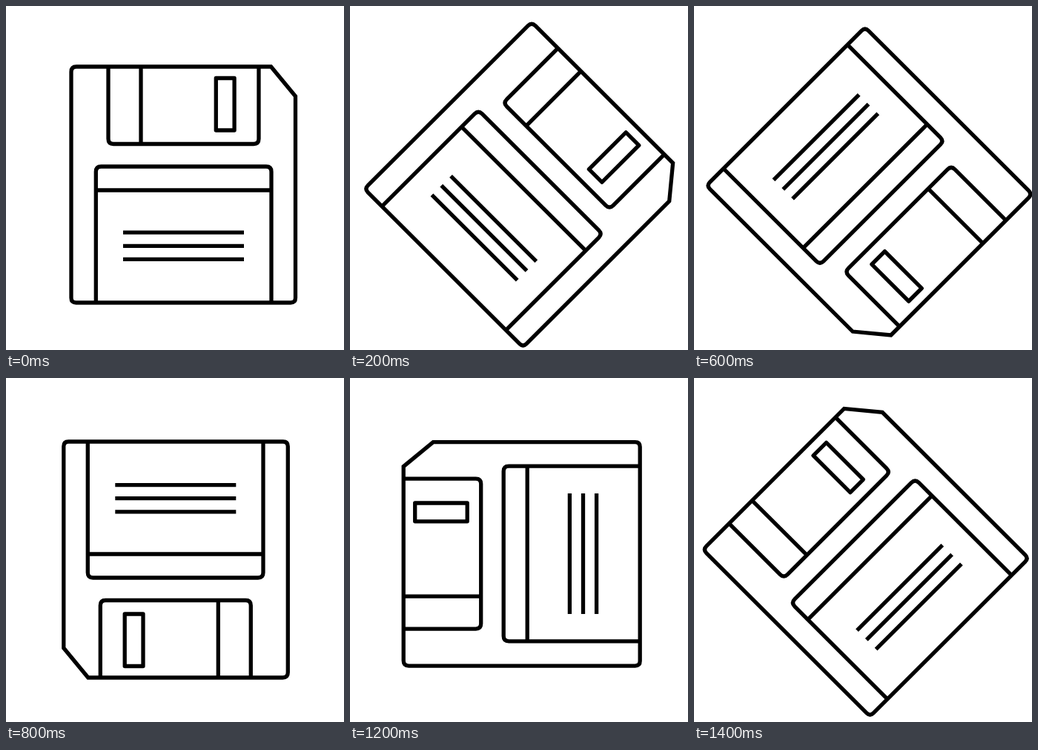
An HTML page that plays this animation: 456x465 px, repeating every 1.6 s.

```html
<!DOCTYPE html>
<html lang="en">
<head>
<meta charset="utf-8">
<title>Spinning floppy disk</title>
<style>
  html, body { margin: 0; width: 100%; height: 100%; overflow: hidden; background: #fff; }
  svg { display: block; width: 100%; height: 100%; }
</style>
</head>
<body>
<svg viewBox="0 0 456 465" fill="none" stroke="#000" stroke-width="5.3">
  <g id="disk">
    <!-- case -->
    <path d="M95 82H357.500L390.500 122V394.500Q390.500 401 384 401H94.500Q88 401 88 394.500V89Q88 82 95 82Z"/>
    <!-- shutter -->
    <path d="M138 82V179.500Q138 186.500 145 186.500H334Q341 186.500 341 179.500V82M182 82V186.500"/>
    <rect x="283.300" y="97.500" width="24.800" height="70.500" stroke-linejoin="round"/>
    <!-- label -->
    <path d="M121.300 401V224Q121.300 217 128.300 217H351Q358 217 358 224V401M121.300 249H358"/>
    <path d="M158 306.200H321M158 324.300H321M158 342.400H321"/>
  </g>
</svg>
<script>
const disk = document.getElementById('disk');
const STEP = 200, STEPS = 8;
// The disk's centre moves on every quarter turn.
const centres = [[239.3, 241.5], [236.5, 248.6], [229, 245.5], [231.7, 237.8]];

function draw(now) {
  const step = Math.floor(now / STEP) % STEPS;
  const [x, y] = centres[step >> 1];
  disk.setAttribute('transform',
    `translate(${x} ${y}) rotate(${step * 45}) translate(-239.3 -241.5)`);
}

let start;
function tick(now) {
  start ??= now;
  draw(now - start);
  requestAnimationFrame(tick);
}
draw(0);
requestAnimationFrame(tick);
</script>
</body>
</html>
```
